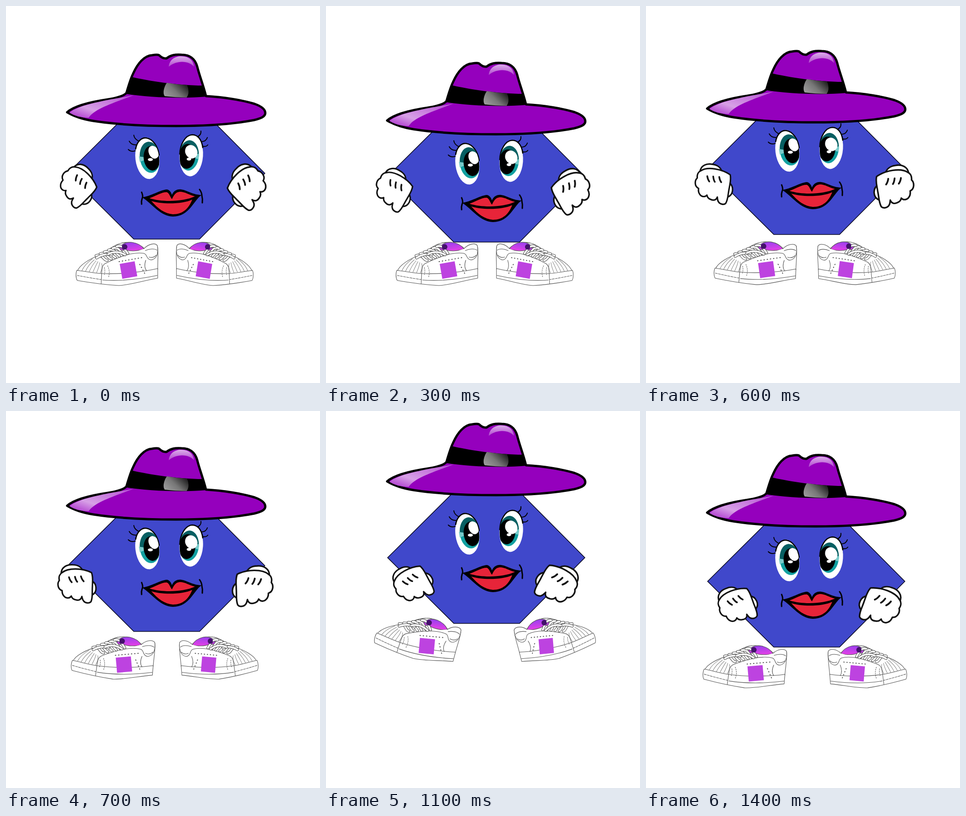
These frames come from a looping animation (683x820 px, 1.5 s). An HTML page:

```html
<!DOCTYPE html>
<html lang="en">
<head>
<meta charset="utf-8">
<title>Bouncing hexagon</title>
<style>
  html, body { margin: 0; width: 100%; height: 100%; overflow: hidden; background: #fff; }
  svg { display: block; width: 100%; height: 100%; }
  .ink { fill: none; stroke: #000; stroke-linecap: round; stroke-linejoin: round; }
</style>
</head>
<body>
<svg viewBox="0 0 683 820">
  <defs>
    <linearGradient id="tongue" x1="0" y1="0" x2=".5" y2="1">
      <stop offset="0" stop-color="#8a3ff0"/><stop offset="1" stop-color="#e040e6"/>
    </linearGradient>
    <linearGradient id="buckle" x1="0" y1=".8" x2="1" y2=".2">
      <stop offset="0" stop-color="#9c9c9c"/><stop offset=".45" stop-color="#777"/><stop offset="1" stop-color="#151515"/>
    </linearGradient>
    <linearGradient id="brimShine" x1="0" y1="1" x2="1" y2="0">
      <stop offset="0" stop-color="#a92acb"/><stop offset=".35" stop-color="#d7a0e6"/><stop offset="1" stop-color="#b550d3"/>
    </linearGradient>
    <linearGradient id="topShine" x1="0" y1="0" x2="0" y2="1">
      <stop offset="0" stop-color="#dcaeea"/><stop offset="1" stop-color="#b147cf"/>
    </linearGradient>
    <linearGradient id="iris" x1="0" y1="0" x2="0" y2="1">
      <stop offset=".45" stop-color="#075f62"/><stop offset=".55" stop-color="#12a0a0"/>
    </linearGradient>
    <clipPath id="leftEye"><ellipse cx="307.5" cy="331" rx="25.5" ry="45" transform="rotate(-7 307.5 331)"/></clipPath>
    <clipPath id="rightEye"><ellipse cx="403" cy="325" rx="25" ry="45" transform="rotate(4 403 325)"/></clipPath>

    <g id="hand" fill="#fff" stroke="#111" stroke-width="3.2" stroke-linecap="round" stroke-linejoin="round">
      <path d="M33 -8C46 -2 48 17 35 24L24 10Z"/>
      <path d="M-32 -21C-33 -37 -19 -43 -7 -42C4 -42 12 -37 15 -29Z"/>
      <path d="M-30 -25C-17 -36 14 -35 34 -25C38 -15 36 -5 36 5C35 18 37 29 33 38C29 43 20 41 17 37C14 34 14 30 13 27C11 35 5 36 -1 34C-6 33 -9 29 -10 26C-14 32 -22 31 -26 26C-29 23 -30 18 -30 14C-40 11 -41 -2 -36 -8C-38 -16 -35 -22 -30 -25Z"/>
      <path d="M-15 -15Q-13 -8 -9 -4M-2 -16Q0 -8 3 -5M11 -17Q13 -10 17 -6" fill="none" stroke-width="3.6"/>
    </g>

    <g id="shoe" transform="translate(-241.5 -560)" fill="#fff" stroke="#555" stroke-width="1.1" stroke-linejoin="round" stroke-linecap="round">
      <path d="M155 577C160 563 182 550 205 541C222 531 236 519 250 516C262 512 284 514 302 528C309 519 324 515 329 521C332 530 330 550 330 573L245 588Z"/>
      <path d="M245 532C248 518 260 513 274 514C287 516 295 521 300 528C290 533 272 534 262 531Z" fill="url(#tongue)"/>
      <path d="M300 528C309 518 324 514 329 521C331 529 330 540 327 545C322 552 314 555 309 549C305 545 306 540 300 538C288 536 276 538 264 541" />
      <path d="M303 532C312 528 323 527 328 531M311 546Q320 549 327 542M264 541C250 545 232 552 216 560C209 564 209 570 208 582" fill="none"/>
      <path d="M154 575C172 577 190 581 208 582C250 584 300 578 330 571L330 592C300 597 270 607 245 608C210 606 178 601 155 597C151 590 152 580 154 575Z"/>
      <path d="M208 582L207 604M210 596C250 599 296 593 329 586" fill="none"/>
      <path d="M155 586Q180 591 207 595" fill="none" stroke-dasharray="5 2"/>
      <g id="ribs" fill="none" stroke="#888"></g>
      <path d="M221 565Q227 577 223 590M214 569Q216 577 214 584" fill="none" stroke-dasharray="2 2.5"/>
      <path d="M246 556L297 547M291 562L303 584" fill="none" stroke-dasharray="1 6" stroke-width="2"/>
      <path d="M304 553Q299 568 306 576" fill="none"/>
      <rect x="250" y="558" width="33" height="33" transform="rotate(-10 266 575)" fill="#bd43e0" stroke="none"/>
      <g id="laces" fill="none"></g>
      <circle cx="258" cy="524" r="6" fill="#43106b" stroke="none"/>
    </g>
  </defs>

  <rect width="683" height="820" fill="#fff"/>
  <path id="body" d="M134 364L278 221H421L563 364L421 507H278Z" fill="#4048cb" stroke="#080820" stroke-width="1.6"/>

  <g id="face">
    <ellipse cx="307.5" cy="331" rx="26" ry="45.5" transform="rotate(-7 307.5 331)" fill="#fff"/>
    <path class="ink" d="M282 311C285 294 295 286 305 287C319 289 330 304 333 324" stroke-width="2.6"/>
    <g clip-path="url(#leftEye)">
      <ellipse cx="313" cy="329" rx="22" ry="34" transform="rotate(-7 313 329)" fill="url(#iris)"/>
      <path d="M289 327L313 331L291 339Z" fill="#79cccb"/>
      <ellipse cx="317" cy="331" rx="17.5" ry="27" transform="rotate(-7 317 331)"/>
      <ellipse cx="321" cy="318" rx="10.5" ry="14.5" transform="rotate(-24 321 318)" fill="#fff"/>
      <ellipse cx="314" cy="334" rx="5.5" ry="3.3" fill="#fff"/>
    </g>
    <ellipse cx="403" cy="325" rx="25.5" ry="45.5" transform="rotate(4 403 325)" fill="#fff"/>
    <path class="ink" d="M378 322C379 300 390 281 405 280C418 280 426 292 428 308" stroke-width="2.6"/>
    <g clip-path="url(#rightEye)">
      <ellipse cx="398" cy="325" rx="21.5" ry="33" transform="rotate(4 398 325)" fill="url(#iris)"/>
      <path d="M420 321L396 328L419 333Z" fill="#79cccb"/>
      <ellipse cx="394" cy="327" rx="18" ry="27" transform="rotate(4 394 327)"/>
      <ellipse cx="403" cy="317" rx="13" ry="15" transform="rotate(-28 403 317)" fill="#fff"/>
      <ellipse cx="398" cy="333" rx="5" ry="3.2" fill="#fff"/>
    </g>
    <path class="ink" stroke-width="2" d="M278 281Q279 289 289 294M268 294Q273 303 284 302M266 312Q272 318 281 315M424 272Q425 280 417 284M438 286Q435 295 425 295M439 302Q435 307 428 305"/>

    <path d="M296 416C315 414 335 400 350 399C356 400 359 405 361 411C364 403 371 398 381 399C395 401 406 411 426 411C409 420 400 458 363 458C335 457 318 430 296 416Z"/>
    <path fill="#e72439" d="M312 418C328 412 340 404 350 405C356 408 357 416 361 420C365 412 368 405 378 404C390 404 398 411 411 414C385 426 340 427 312 418ZM316 424C340 432 385 431 405 421C398 440 385 453 363 453C345 452 330 440 316 424Z"/>
    <path class="ink" stroke-width="3" d="M295 405Q299 414 296 419Q294 425 295 431M421 399Q426 406 426 412Q428 420 427 428"/>
  </g>

  <g id="hat">
    <path d="M133 231C150 216 188 208 222 203C241 200 257 195 262 189C266 176 270 160 277 146C286 126 300 108 318 107Q329 105 333 107Q341 115 349 114C358 107 367 105 382 106C400 106 411 114 416 132C421 152 429 172 435 196C472 198 516 205 541 213C558 219 564 226 564 233C564 241 553 245 540 248C500 256 440 261 370 261C300 261 235 257 190 250C165 246 148 240 133 231Z" fill="#9500bd" stroke="#000" stroke-width="5" stroke-linejoin="round"/>
    <path d="M272 154C310 163 375 173 428 173L437 197C385 202 310 199 260 191Q265 176 272 154Z"/>
    <path d="M350 167Q372 171 394 172Q397 179 397 186Q397 194 393 199Q368 199 345 196Q342 191 343 184Q345 173 350 167Z" fill="url(#buckle)"/>
    <path d="M354 132C356 114 372 107 388 110C402 112 408 122 409 132C398 119 372 117 354 132Z" fill="url(#topShine)"/>
    <path d="M138 232C162 213 220 205 278 194C240 209 192 223 180 243C163 243 149 239 138 232Z" fill="url(#brimShine)"/>
  </g>

  <use id="shoeL" href="#shoe"/>
  <use id="shoeR" href="#shoe"/>
  <use id="handL" href="#hand"/>
  <use id="handR" href="#hand"/>
</svg>
<script>
const el = id => document.getElementById(id);
const STEP = 100, LOOP = 1500;

// Pose keys, in steps of 100 ms
const keys = [0, 3, 5, 6, 7, 9, 11, 12, 14];
const track = {
  hat:    [0, 18, 10, -8, -25, -55, -78, -93, -10],
  face:   [0, 12, 0, -16, -32, -61, -64, -64, -6],
  body:   [0, 6.5, 6.5, -10, -27.5, -45, -45, -45, 6.5],
  shoeX:  [0, 0, 0, -3.5, -8.5, -21.5, -42.5, -52, -26.5],
  shoeY:  [560, 560, 560, 558, 535, 498, 491, 490, 554],
  shoeA:  [0, 0, 0, 2, 5, 9.5, 15, 17, 5],
  leftX:  [155.5, 146.5, 139.5, 146, 152, 160.5, 187.5, 195, 197],
  leftY:  [389, 398.5, 398, 387, 376.5, 361.5, 376, 390, 422],
  rightX: [526, 534.5, 543, 541, 539, 528.5, 504, 503, 512],
  rightY: [391, 401.5, 402.5, 392, 381.5, 369, 376.5, 391, 423],
  handA:  [43, 28, 16, 8, 0, -18, -30, -30, -22]
};

function value(name, n) {
  const v = track[name];
  let i = 0;
  while (i < keys.length - 2 && n >= keys[i + 1]) i++;
  return v[i] + (v[i + 1] - v[i]) * (n - keys[i]) / (keys[i + 1] - keys[i]);
}

function place(id, x, y, angle = 0, sx = 1, sy = 1) {
  el(id).setAttribute("transform", `translate(${x} ${y}) scale(${sx} ${sy}) rotate(${angle})`);
}

function buildShoe() {
  let ribs = "", laces = "";
  for (let i = 0; i < 6; i++) {
    const x = 165 + i * 8;
    ribs += `<path d="M${x} ${576 + i}Q${x + 6} ${562 + i} ${188 + i * 4} ${550 + i * 2}"/>`;
  }
  const lace = d => `<path d="${d}" stroke="#444" stroke-width="6"/><path d="${d}" stroke="#fff" stroke-width="4"/>`;
  for (let i = 0; i < 6; i++) {
    const x = 196 + i * 9, y = 543 - i * 4;
    laces += lace(`M${x} ${y}Q${x + 9} ${y - 3} ${x + 15} ${y + 4}T${x + 24} ${y + 10 + i}`);
  }
  laces += lace("M197 548Q213 537 230 541") + lace("M222 540Q240 530 259 541");
  el("ribs").innerHTML = ribs;
  el("laces").innerHTML = laces;
}

function draw(ms) {
  const n = Math.floor((ms % LOOP) / STEP);
  const at = name => value(name, n);
  for (const id of ["hat", "face", "body"]) place(id, 0, at(id));
  place("shoeL", 241.5 + at("shoeX"), at("shoeY"), at("shoeA"));
  place("shoeR", 454 - at("shoeX") * 1.04, at("shoeY"), at("shoeA"), -0.94);
  place("handL", at("leftX"), at("leftY"), at("handA"));
  place("handR", at("rightX"), at("rightY"), at("handA"), -1.06, 1.06);
}

buildShoe();
const start = performance.now();
function tick() {
  draw(performance.now() - start);
  requestAnimationFrame(tick);
}
tick();
</script>
</body>
</html>
```
